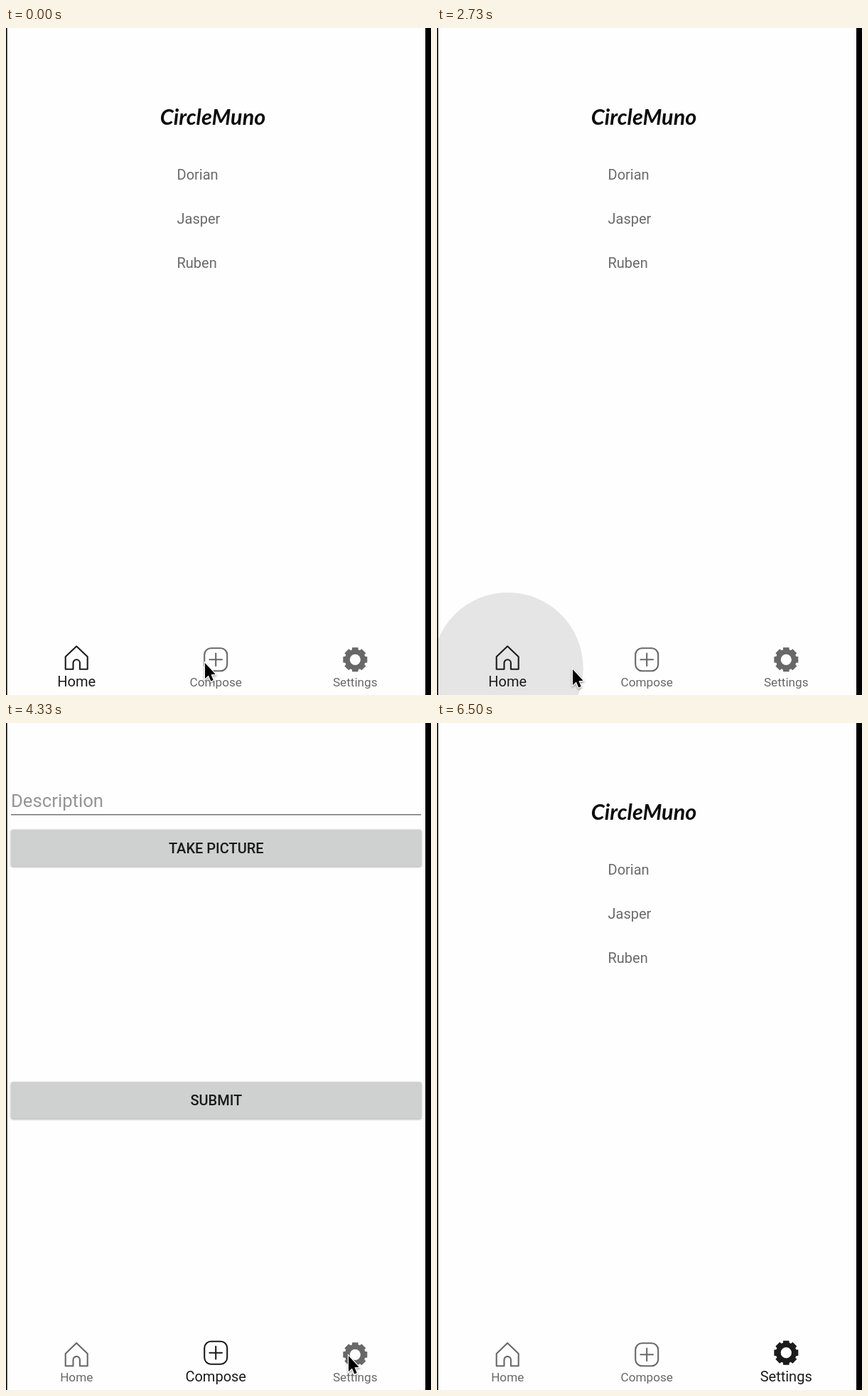
Recreate the animation shown at these times as an HTML page with a canvas. Size 598 by 937 pixels, loop 7.23 s.

```html
<!DOCTYPE html>
<html lang="en">
<head>
<meta charset="utf-8">
<title>Contacts app</title>
<style>
html, body { margin: 0; width: 100%; height: 100%; overflow: hidden; background: #fefefe; }
canvas { display: block; }
</style>
</head>
<body>
<canvas id="stage" width="598" height="937"></canvas>
<script>
const ctx = document.getElementById('stage').getContext('2d');
const LOOP = 7230;
const PAPER = '#fefefe';
const TABS = [
  { label: 'Home', x: 99, icon: house },
  { label: 'Compose', x: 295, icon: plusBox },
  { label: 'Settings', x: 491, icon: gear }
];
const NAMES = ['Dorian', 'Jasper', 'Ruben'];
const TAPS = [{ tab: 0, at: 2502 }, { tab: 1, at: 3376 }, { tab: 2, at: 5530 }];
const COMPOSE_AT = 3470, SETTINGS_AT = 5620;
const RELOAD = [2600, 2665];
const STALLS = [[2730, 2770], [3600, 3670], [5770, 5870]];

// Pointer legs: start, end, from, to, easing
const LEGS = [
  [370, 930, [280, 892], [294.5, 892], smooth],
  [1470, 1500, [295, 892], [295, 891.5], smooth],
  [1900, 2300, [295, 892], [100, 901.5], smooth],
  [2600, 2730, [100, 901.5], [191, 901], easeIn],
  [2770, 3130, [191, 901], [318, 893], easeOut],
  [3680, 4070, [318, 893], [457, 889.5], smooth],
  [4100, 4330, [457, 889.5], [482, 889], easeOut],
  [5130, 5270, [482, 889], [485.5, 888], smooth],
  [6170, 6500, [485.5, 888], [276, -36], easeIn]
];

function clamp(v) { return Math.max(0, Math.min(1, v)); }
function mix(a, b, k) { return a + (b - a) * k; }
function smooth(k) { return k * k * (3 - 2 * k); }
function easeIn(k) { return Math.pow(k, 1.6); }
function easeOut(k) { return 1 - Math.pow(1 - k, 2); }

function text(str, x, y, font, color, align = 'left') {
  ctx.font = font;
  ctx.fillStyle = color;
  ctx.textAlign = align;
  ctx.fillText(str, x, y);
}

function roboto(size, weight = 400) {
  return `${weight} ${size}px Roboto, sans-serif`;
}

function polygon(points) {
  ctx.beginPath();
  points.forEach(([x, y]) => ctx.lineTo(x, y));
  ctx.closePath();
}

function house() {
  ctx.beginPath();
  ctx.moveTo(-15.3, 16);
  ctx.lineTo(-15.3, -1.4);
  ctx.lineTo(0.2, -16.2);
  ctx.lineTo(15.7, -1.4);
  ctx.lineTo(15.7, 16);
  ctx.lineTo(4.9, 16);
  ctx.lineTo(4.9, 7.3);
  ctx.arc(0.2, 7.3, 4.7, 0, Math.PI, true);
  ctx.lineTo(-4.5, 16);
  ctx.closePath();
  ctx.stroke();
}

function plusBox() {
  ctx.beginPath();
  ctx.roundRect(-15.8, -16, 32, 32, 9.2);
  ctx.moveTo(-8.6, 0);
  ctx.lineTo(9, 0);
  ctx.moveTo(0.2, -8.8);
  ctx.lineTo(0.2, 8.8);
  ctx.stroke();
}

function gear() {
  const rim = [];
  for (let i = 0; i < 8; i++) {
    for (const [off, r] of [[-0.31, 14.6], [-0.24, 17.5], [0.24, 17.5], [0.31, 14.6]]) {
      const a = i * Math.PI / 4 + off;
      rim.push([0.3 + r * Math.cos(a), r * Math.sin(a)]);
    }
  }
  polygon(rim);
  ctx.moveTo(7.9, 0);
  ctx.arc(0.3, 0, 7.6, 0, Math.PI * 2);
  ctx.fill('evenodd');
}

function drawHome(t) {
  text('CircleMuno', 291, 135.5, 'italic 700 30.6px Lato, sans-serif', '#0c0c0c', 'center');
  if (t >= RELOAD[0] && t < RELOAD[1]) return;
  NAMES.forEach((name, i) => text(name, 240.5, 213 + i * 62, roboto(20), '#6a6a6a'));
}

function drawButton(label, y) {
  ctx.save();
  ctx.shadowColor = 'rgba(0,0,0,.35)';
  ctx.shadowBlur = 3;
  ctx.shadowOffsetY = 1;
  ctx.fillStyle = '#cfd1d0';
  ctx.beginPath();
  ctx.roundRect(7, y, 577.5, 51.5, 2.5);
  ctx.fill();
  ctx.restore();
  text(label, 295.8, y + 33.2, roboto(20, 500), '#1a1a1a', 'center');
}

function drawCompose() {
  text('Description', 7, 118, roboto(25.7), '#959595');
  ctx.fillStyle = '#757575';
  ctx.fillRect(7, 128, 577, 1.5);
  drawButton('TAKE PICTURE', 149.7);
  drawButton('SUBMIT', 504.2);
}

function drawRipple({ tab, at }, t) {
  const age = t - at;
  const alpha = 0.115 * clamp(age / 75) * (1 - clamp((age - 218) / 65));
  if (alpha <= 0) return;
  ctx.fillStyle = `rgba(0,0,0,${alpha})`;
  ctx.beginPath();
  ctx.arc(TABS[tab].x + 0.7, 899, 106 * mix(0.3, 1, smooth(clamp(age / 220))), 0, Math.PI * 2);
  ctx.fill();
}

// How far each tab is switched on
function tabLevels(t) {
  const compose = smooth(clamp((t - COMPOSE_AT) / 115));
  const settings = smooth(clamp((t - SETTINGS_AT) / 115));
  return [1 - compose, compose - settings, settings];
}

function drawTab({ label, x, icon }, on) {
  const tone = Math.round(mix(104, 27, on));
  const color = `rgb(${tone},${tone},${tone})`;
  ctx.save();
  ctx.translate(x, mix(887.3, 884.7, on));
  ctx.strokeStyle = ctx.fillStyle = color;
  ctx.lineWidth = 2.1;
  ctx.lineJoin = ctx.lineCap = 'round';
  icon();
  ctx.restore();
  text(label, x + 0.2, mix(925, 924.7, on), roboto(mix(17.15, 20, on)), color, 'center');
}

function pointerAt(t) {
  let pos = LEGS[0][2];
  for (const [start, end, from, to, ease] of LEGS) {
    if (t < start) break;
    const k = ease(clamp((t - start) / (end - start)));
    pos = [mix(from[0], to[0], k), mix(from[1], to[1], k)];
  }
  return pos;
}

function drawPointer(t) {
  const [x, y] = pointerAt(t);
  ctx.save();
  ctx.translate(x, y);
  polygon([[0, 0], [0, 22], [4.9, 17.5], [8.3, 25.6], [11.7, 24.1], [8.4, 16.2], [14.6, 15.8]]);
  ctx.lineJoin = 'miter';
  ctx.lineWidth = 2.4;
  ctx.strokeStyle = '#fff';
  ctx.shadowColor = 'rgba(0,0,0,.4)';
  ctx.shadowBlur = 3;
  ctx.shadowOffsetY = 1.5;
  ctx.stroke();
  ctx.shadowColor = 'transparent';
  ctx.fillStyle = '#000';
  ctx.fill();
  ctx.restore();
}

function draw(t) {
  for (const [a, b] of STALLS) if (t >= a && t < b) t = a;
  ctx.fillStyle = PAPER;
  ctx.fillRect(0, 0, 598, 937);
  if (t >= COMPOSE_AT && t < SETTINGS_AT) drawCompose();
  else drawHome(t);
  TAPS.forEach(tap => drawRipple(tap, t));
  const levels = tabLevels(t);
  TABS.forEach((tab, i) => drawTab(tab, levels[i]));
  ctx.fillStyle = '#000';
  ctx.fillRect(0, 0, 1.6, 937);
  ctx.fillRect(590, 0, 8, 937);
  drawPointer(t);
}

const began = performance.now();
function tick() {
  draw((performance.now() - began) % LOOP);
  requestAnimationFrame(tick);
}
tick();
</script>
</body>
</html>
```
